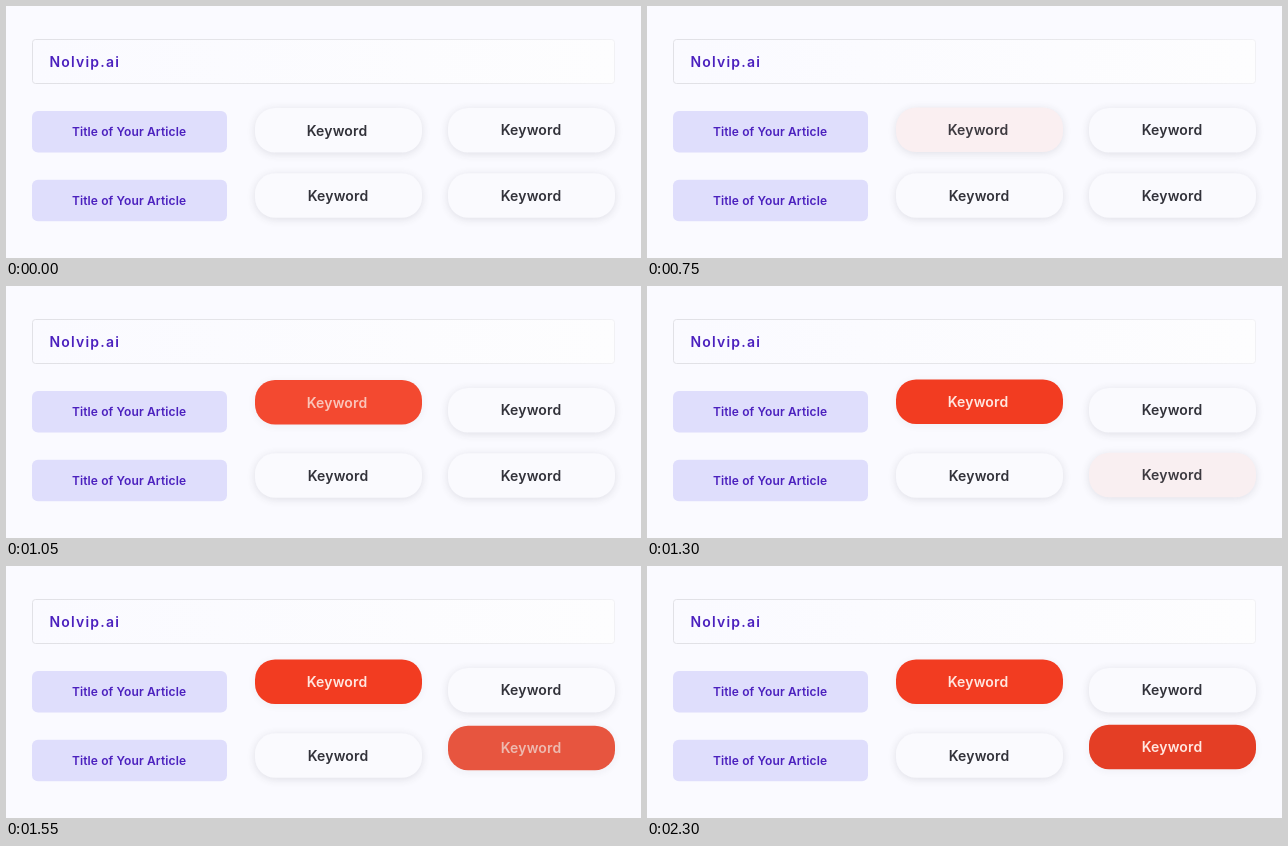
An HTML page that plays this animation: 635x252 px, repeating every 2.5 s.

```html
<!DOCTYPE html>
<html lang="en">
<head>
<meta charset="utf-8">
<title>Keyword buttons</title>
<style>
  html, body { margin: 0; width: 100%; height: 100%; overflow: hidden; background: #fafaff; }
  svg { display: block; width: 635px; height: 252px; }
  text { font-family: Inter, "Open Sans", sans-serif; font-weight: 600; }
  .brand { font-size: 14px; letter-spacing: 1.2px; fill: #4b20be; }
  .title { font-size: 12px; letter-spacing: .12px; fill: #4b20be; text-anchor: middle; }
  .keyword { font-size: 14px; letter-spacing: .15px; text-anchor: middle; }
  .shade { fill: #28283c; filter: url(#soft); }
</style>
</head>
<body>
<svg id="stage" viewBox="0 0 635 252">
  <defs>
    <filter id="soft" x="-15%" y="-50%" width="130%" height="200%"><feGaussianBlur stdDeviation="4.5"/></filter>
    <linearGradient id="bar"><stop stop-color="#fafaff"/><stop offset="1" stop-color="#fdfdfe"/></linearGradient>
    <linearGradient id="edge"><stop stop-color="#e1e1e6"/><stop offset=".7" stop-color="#e8e8eb"/><stop offset="1" stop-color="#f1f1f4"/></linearGradient>
  </defs>
  <rect width="635" height="252" fill="#fafaff"/>
  <rect x="26.5" y="33.5" width="582" height="44" rx="3" fill="url(#bar)" stroke="url(#edge)"/>
  <text class="brand" x="43.5" y="61">Nolvip.ai</text>
</svg>
<script>
  const LOOP = 2500, STEP = 50;
  const EASE = [.06, .28, .5, .67, .79, .88, .93, .97, .99, 1];
  const PALE = [250, 250, 254];
  const INK = [
    [0, [50, 50, 58]],
    [.5, [138, 114, 108]],
    [.93, [250, 196, 185]],
    [1, [255, 230, 223]]
  ];
  const stage = document.getElementById('stage');

  function add(parent, tag, attrs, content = '') {
    const el = document.createElementNS('http://www.w3.org/2000/svg', tag);
    for (const key in attrs) el.setAttribute(key, attrs[key]);
    el.textContent = content;
    return parent.appendChild(el);
  }

  const mix = (a, b, p) => a.map((v, i) => v + (b[i] - v) * p);
  const rgb = c => `rgb(${c.map(Math.round)})`;

  function inkAt(p) {
    const i = Math.max(1, INK.findIndex(stop => stop[0] >= p));
    const [p0, c0] = INK[i - 1], [p1, c1] = INK[i];
    return mix(c0, c1, (p - p0) / (p1 - p0));
  }

  function addTitle(y) {
    add(stage, 'rect', { x: 26, y, width: 195, height: 41.5, rx: 6, fill: '#dfdefc' });
    add(stage, 'text', { class: 'title', x: 123, y: y + 25 }, 'Title of Your Article');
  }

  function addPill(x, y, textX, textY) {
    const box = { x, y, width: 167, height: 44.5, rx: 20 };
    const group = add(stage, 'g', {});
    const shade = add(group, 'rect', { ...box, y: y + 1.5, class: 'shade' });
    const face = add(group, 'rect', box);
    const label = add(group, 'text', { class: 'keyword', x: textX, y: textY }, 'Keyword');
    return (p, red) => {
      group.setAttribute('transform', `translate(0 ${-8.6 * p})`);
      shade.setAttribute('opacity', .13 - .08 * p);
      face.setAttribute('fill', rgb(mix(PALE, red, p)));
      label.setAttribute('fill', rgb(inkAt(p)));
    };
  }

  [105, 173.8].forEach(addTitle);
  const pills = [
    { paint: addPill(249, 102, 331, 130), start: 750, red: [242, 60, 33] },
    { paint: addPill(442, 102, 525, 129.3) },
    { paint: addPill(249, 167.3, 332, 194.6) },
    { paint: addPill(442, 167.3, 525, 194.6), start: 1300, red: [228, 62, 37] }
  ];

  function progress(time, start = Infinity) {
    const k = Math.floor((time - start) / STEP);
    return k < 0 ? 0 : EASE[Math.min(k, EASE.length - 1)];
  }

  function draw() {
    const time = performance.now() % LOOP;
    for (const { paint, start, red = PALE } of pills) paint(progress(time, start), red);
    requestAnimationFrame(draw);
  }
  draw();
</script>
</body>
</html>
```
